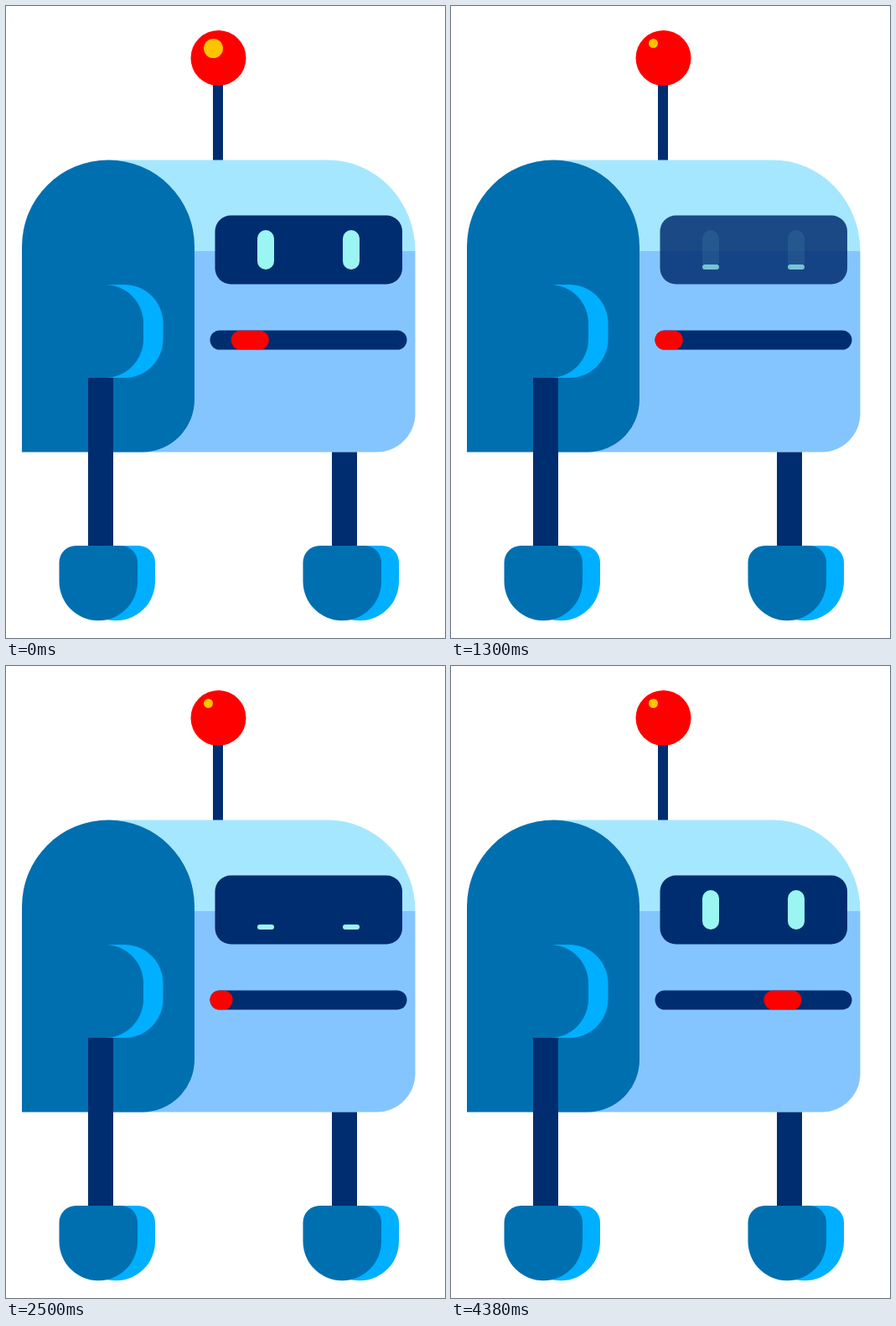
Recreate the animation shown at these times as an HTML page. Size 524x753 px, loop 4570 ms.

```html
<!DOCTYPE html>
<html lang="en">
<head>
<meta charset="utf-8">
<title>Robot</title>
<style>
  html, body { margin: 0; width: 100%; height: 100%; overflow: hidden; background: #fff; }
  svg { display: block; width: 524px; height: 753px; }
  .navy { fill: #002d70; }
  .side { fill: #006fb0; }
  .bright { fill: #00afff; }
  .red { fill: #f00; }
  .eyes { fill: #9bf6f3; }
</style>
</head>
<body>
<svg viewBox="0 0 524 753">
  <defs>
    <path id="foot" d="M20 0H73.500A20 20 0 0 1 93.500 20V42.500A46.750 46.750 0 0 1 0 42.500V20A20 20 0 0 1 20 0Z"/>
    <path id="knob" d="M0 0A46 46 0 0 1 46 46V65A46 46 0 0 1 0 111Z"/>
    <clipPath id="mouthShape"><rect x="243.500" y="386.500" width="235" height="23" rx="11.500"/></clipPath>
  </defs>

  <!-- Antenna -->
  <rect class="navy" x="247" y="85" width="12" height="99"/>
  <circle class="red" cx="253.500" cy="62" r="33"/>
  <circle id="shine" fill="#ffc400"/>

  <!-- Body -->
  <path fill="#a5e7ff" d="M122 183.500H384A104.500 108.500 0 0 1 488.500 292H122Z"/>
  <path fill="#85c5ff" d="M122 292H488.500V485.500A46 46 0 0 1 442.500 531.500H122Z"/>
  <path class="side" d="M19 531.500V286.500A103 103 0 0 1 225 286.500V469A62.500 62.500 0 0 1 162.500 531.500Z"/>
  <path class="bright" d="M118 332H141.500A46 46 0 0 1 187.500 378V397A46 46 0 0 1 141.500 443H118Z"/>
  <use href="#knob" class="side" x="118" y="332"/>

  <!-- Legs -->
  <rect class="navy" x="98" y="443" width="30" height="201"/>
  <rect class="navy" x="389" y="531.500" width="30" height="112.500"/>
  <use href="#foot" class="bright" x="84.500" y="643"/>
  <use href="#foot" class="side" x="63.500" y="643"/>
  <rect class="bright" x="138" y="643" width="19" height="0"/>
  <use href="#foot" class="bright" x="375.500" y="643"/>
  <use href="#foot" class="side" x="354.500" y="643"/>

  <!-- Face -->
  <rect id="screen" class="navy" x="249.500" y="249.500" width="223.500" height="82" rx="19"/>
  <g id="openEyes" class="eyes">
    <rect x="300" y="267" width="20" height="47" rx="10"/>
    <rect x="402" y="267" width="20" height="47" rx="10"/>
  </g>
  <g id="closedEyes" class="eyes">
    <rect x="300" y="308" width="20" height="6" rx="3"/>
    <rect x="402" y="308" width="20" height="6" rx="3"/>
  </g>
  <g clip-path="url(#mouthShape)">
    <rect class="navy" x="243" y="386" width="236" height="24"/>
    <rect id="pill" class="red" y="386.500" width="45" height="23" rx="11.500"/>
  </g>
</svg>
<script>
  const LOOP = 4570;
  const BLINK = LOOP / 6;
  const SWEEP = 1180;
  const FADE = 300;

  const part = id => document.getElementById(id);
  const set = (id, attributes) => {
    for (const [name, value] of Object.entries(attributes)) part(id).setAttribute(name, value);
  };
  const ramp = (time, start) => Math.min(1, Math.max(0, (time - start) / FADE));

  function draw(time) {
    // The shine alternates between two sizes.
    const small = Math.floor((time - 612 + LOOP) / BLINK) % 2 === 0;
    set("shine", small ? { cx: 241.5, cy: 44.5, r: 5.5 } : { cx: 247.5, cy: 50.5, r: 11.5 });

    // The whole screen thins slightly while the eyes cross-fade.
    const closed = ramp(time, 1090) - ramp(time, 3900);
    set("screen", { opacity: 1 - 0.75 * closed * (1 - closed) });
    set("openEyes", { opacity: (1 - closed) ** 2 });
    set("closedEyes", { opacity: closed });

    // The pill sweeps left across the mouth, then waits out of sight.
    const elapsed = (time - 500 + SWEEP) % SWEEP;
    set("pill", { x: 478.5 - 0.308 * elapsed });
  }

  const start = performance.now();
  function tick() {
    draw((performance.now() - start) % LOOP);
    requestAnimationFrame(tick);
  }
  tick();
</script>
</body>
</html>
```
